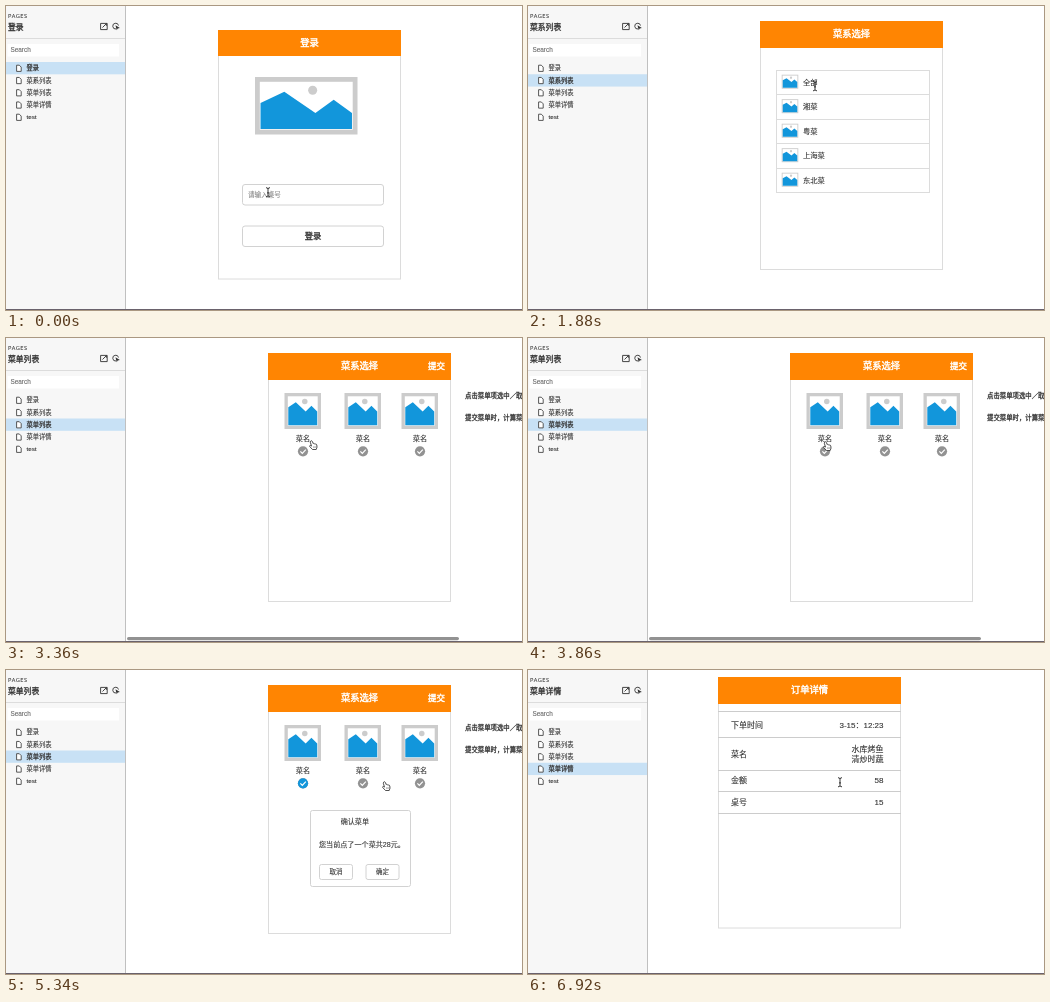
Animation, 516 px wide and 304 px high, one loop 6.94 s. Source, as an HTML page:

```html
<!DOCTYPE html>
<html lang="zh-CN">
<head>
<meta charset="utf-8">
<style>
html, body { margin: 0; width: 100%; height: 100%; overflow: hidden; background: #fff; }
svg { display: block; width: 516px; height: 304px; font-family: "Liberation Sans", "Noto Sans CJK SC", sans-serif; }
.caps { font-family: "Open Sans", sans-serif; letter-spacing: .5px; }
.anim { animation: 6940ms linear infinite; }
.step { animation-timing-function: step-end; }
</style>
</head>
<body>
<svg id="stage" viewBox="0 0 516 304"></svg>
<script>
const LOOP = 6940, BLUE = '#1296db', GREY = '#ccc', EDGE = '#dcdcdc';
const NAMES = ['登录', '菜系列表', '菜单列表', '菜单详情', 'test'];
let css = '', groups = 0;

const at = t => (t / LOOP * 100).toFixed(3) + '%';
const each = (list, draw) => list.map(draw).join('');

// Text placed by its vertical centre; the outline sets the weight.
const text = (x, y, size, str, { fill = '#333', anchor = 'start', weight = .015, extra = '' } = {}) =>
  `<text x="${x}" y="${y + size * .35}" font-size="${size}" fill="${fill}" stroke="${fill}" stroke-width="${size * weight}" text-anchor="${anchor}" ${extra}>${str}</text>`;
const mid = (x, y, size, str, more) => text(x, y, size, str, { anchor: 'middle', ...more });
const rect = (x, y, w, h, fill, stroke = 'none', r = 0) =>
  `<rect x="${x}" y="${y}" width="${w}" height="${h}" rx="${r}" fill="${fill}" stroke="${stroke}"/>`;
const line = (x1, x2, y, color = EDGE) => `<path d="M${x1} ${y}H${x2}" stroke="${color}"/>`;

const HEAD = { fill: '#fff', weight: .05 };
const STRONG = { weight: .04 };

// Group visible only during the given [from, to] spans.
function during(body, ...spans) {
  const name = 'g' + groups++, last = spans[spans.length - 1][1];
  const keys = each(spans, ([from, to]) =>
    `${at(from)}{opacity:1}` + (to < LOOP ? `${at(to)}{opacity:0}` : ''));
  css += `@keyframes ${name}{${spans[0][0] ? '0%{opacity:0}' : ''}${keys}100%{opacity:${+(last === LOOP)}}}`;
  return `<g class="anim step" style="animation-name:${name}">${body}</g>`;
}

// Placeholder image; depth scales how far the hills reach down.
function picture(x, y, w, h, b, depth = 1) {
  const gap = b * .15, iw = w - 2 * b, ih = h - 2 * b;
  const px = u => x + b + gap + u * (iw - 2 * gap), py = v => y + b + v * (ih - gap);
  const hills = [[0, .45], [.26, .21], [.6, .66], [.8, .38], [1, .66]].map(([u, v]) => [u, .21 + (v - .21) * depth]);
  const pts = [...hills, [1, 1], [0, 1]].map(([u, v]) => px(u) + ',' + py(v)).join(' ');
  return rect(x, y, w, h, GREY) + rect(x + b, y + b, iw, ih, '#fff') +
    `<circle cx="${px(.57)}" cy="${py(.18)}" r="${ih * .094}" fill="${GREY}"/><polygon points="${pts}" fill="${BLUE}"/>`;
}

const frame = (x, y, title, h, head) =>
  rect(x + .5, y + .5, 182, h, '#fff', EDGE) + rect(x, y, 183, head, '#ff8502') +
  mid(x + 91.5, y + head / 2 - .7, 9.3, title, HEAD);

const check = (x, fill) =>
  `<circle cx="${x}" cy="113.3" r="5.1" fill="${fill}"/><path d="M${x - 2.6} 113.4l1.9 1.9 3.5-3.7" fill="none" stroke="#fff" stroke-width="1.2"/>`;

const docIcon = y =>
  `<path d="M10.6 ${y - 3.1}h2.7l1.9 1.9v4.3h-4.6z" fill="#fff" stroke="#444" stroke-width=".9"/>`;

function sidebar() {
  return rect(0, 0, 119, 304, '#f7f7f7') +
    text(2, 10, 5.7, 'PAGES', { extra: 'class="caps"' }) +
    `<g fill="none" stroke="#333" stroke-width=".9"><path d="M98 17.4h-3.400v6.200h6.600v-6.200h-1M96.500 21.500l3.700-3.700M98 17.400h2.400v2.400"/>
     <path d="M112.500 19.500a2.900 2.900 0 1 0-2.500 3.500"/></g><path d="M109.500 19.200l4.400 2.800-2.200.4-1 1.900z" fill="#333"/>` +
    line(0, 119, 32.5) + rect(1.5, 38, 111.5, 12.5, '#fff') + text(4.5, 44, 6.4, 'Search', { fill: '#666' });
}

function nav(current) {
  const rowY = i => 62.3 + i * 12.25;
  return text(2, 20.8, 7.8, NAMES[current], STRONG) +
    rect(0, rowY(current) - 6.3, 119, 12.3, '#c8e1f5') +
    each(NAMES, (name, i) => docIcon(rowY(i)) + text(20.5, rowY(i), 6.25, name, i === current ? STRONG : {}));
}

function loginPage() {
  const field = y => rect(236.5, y, 141, 20.5, '#fff', '#d2d2d2', 2.5);
  const input = (str, from, to, fill) => during(text(242, 188.6, 6.6, str, { fill }), [from, to]);
  const typed = i => 320 + i * 50;
  return frame(212, 24, '登录', 248.5, 26) + picture(249, 71, 102.5, 57.5, 4.8) + field(178.5) + field(220) +
    input('请输入桌号', 0, typed(0), '#888') +
    each([0, 1, 2], i => input('123'.slice(0, i + 1), typed(i), i < 2 ? typed(i + 1) : 1600)) +
    mid(307, 230, 8.3, '登录', STRONG);
}

function cuisinePage() {
  const rows = ['全部', '湘菜', '粤菜', '上海菜', '东北菜'];
  const top = i => 64 + i * 24.5;
  return frame(232, 15, '菜系选择', 248, 27) + rect(248.5, 64.5, 153, 122, '#fff', EDGE) +
    each(rows, (name, i) => (i ? line(248, 402, Math.floor(top(i)) + .5) : '') +
      picture(253.7, top(i) + 4.7, 16.6, 14, .9, .7) + text(275, top(i) + 12.2, 7.3, name));
}

function dialog() {
  const box = (x, y, w, h) => rect(x, y, w, h, '#fff', '#d2d2d2', 2);
  const button = (x, label) => box(x, 194.5, 33, 15) + mid(x + 16.5, 202, 6.5, label);
  return box(304.5, 140.5, 100, 76) + text(334.7, 152, 7.1, '确认菜单') +
    text(313, 174.5, 7.1, '您当前点了一个菜共28元。') + button(313.5, '取消') + button(360, '确定');
}

function dishPage() {
  return frame(262, 15, '菜系选择', 248, 27) + mid(430.5, 28, 8.5, '提交', HEAD) +
    each([297, 357, 414], x => picture(x - 18.5, 55, 36.5, 36, 3.3, .7) + mid(x, 100, 7.2, '菜名') + check(x, '#929292')) +
    during(check(297, BLUE), [3900, 6100]) +
    text(459, 58, 6.4, '点击菜单项选中／取消', STRONG) + text(459, 79.5, 6.4, '提交菜单时，计算菜单', STRONG) +
    during(dialog(), [5060, 6100]);
}

function orderPage() {
  const fields = [
    [55, '下单时间', '3-15：12:23'], [84.5, '菜名', '水库烤鱼', '清炒时蔬'], [110, '金额', '58'], [132, '桌号', '15']
  ];
  return frame(190, 7, '订单详情', 250.5, 27) + each([41.5, 67.5, 100.5, 121.5, 143.5], y => line(190, 373, y, GREY)) +
    each(fields, ([y, label, ...values]) => text(203, y, 8, label) +
      each(values, (v, i) => text(355.5, y + (i - (values.length - 1) / 2) * 10, 8, v, { anchor: 'end' })));
}

function scrollbar() {
  css += `@keyframes bar{0%,${at(3179)}{opacity:0}${at(3180)},${at(3900)}{opacity:1}${at(4080)},100%{opacity:0}}`;
  return `<g class="anim" style="animation-name:bar">${rect(121, 299, 332, 3.2, '#929292', 'none', 1.6)}</g>`;
}

function pointer() {
  // Each move: start, end, target x, target y; the pointer rests in between.
  const moves = [
    [560, 1140, 278, 226], [1600, 1880, 287, 80], [2000, 2780, 291, 103], [3180, 3360, 307, 107], [3380, 3860, 299, 108],
    [3880, 4380, 348, 72], [4640, 5000, 430, 30], [5260, 5340, 380, 116], [5400, 5900, 376, 203], [6420, 6920, 312, 112]
  ];
  const pose = (t, [x, y]) => `${at(t)}{transform:translate(${x}px,${y}px);animation-timing-function:ease-in-out}`;
  let pos = [262, 186], keys = pose(0, pos);
  for (const [start, end, ...next] of moves) {
    keys += pose(start, pos) + pose(end, next);
    pos = next;
  }
  css += `@keyframes move{${keys + pose(LOOP, pos)}}`;
  const beam = '<path d="M-2-4.3Q0-4.3 0-3Q0-4.3 2-4.3M0-3V3.5M-2 4.8Q0 4.8 0 3.5Q0 4.8 2 4.8M-1 .9H1" fill="none" stroke="#222" stroke-width=".9"/>';
  const hand = '<path d="M-2.3-3.9Q-1.2-4.9-.6-3.5L.1-1.5Q.9-2.1 1.4-1.2Q2.2-1.7 2.7-.8Q3.6-1 3.8 0L4 2.2 3.2 4.5H-.5L-3.3 1.5Q-3.6.3-2.3.5L-1.5 1.1-2.7-2.8Z" fill="#fff" stroke="#333" stroke-width=".85" stroke-linejoin="round"/><path d="M.6 1.2V3M1.8 1.2V3M2.9 1.2V3" stroke="#555" stroke-width=".4"/>';
  return '<g class="anim" style="animation-name:move">' +
    during(beam, [0, 320], [560, 1000], [1820, 2100], [6500, LOOP]) +
    during(hand, [1000, 1820], [2100, 6500]) + '</g>';
}

// Page, time it opens, time its content goes; the sidebar follows the openings.
const pages = [[loginPage, 0, 1600], [cuisinePage, 1600, 2980], [dishPage, 3180, 6100], [orderPage, 6420, LOOP]];

document.getElementById('stage').innerHTML = sidebar() +
  each(pages, ([draw, from, to], i) =>
    during(nav(i), [from, pages[i + 1] ? pages[i + 1][1] : LOOP]) + during(draw(), [from, to])) +
  scrollbar() + '<path d="M119.5 0V304" stroke="#c0c0c0"/>' + line(0, 516, 303.5, '#6a626c') + pointer();
document.head.appendChild(document.createElement('style')).textContent = css;
</script>
</body>
</html>
```
